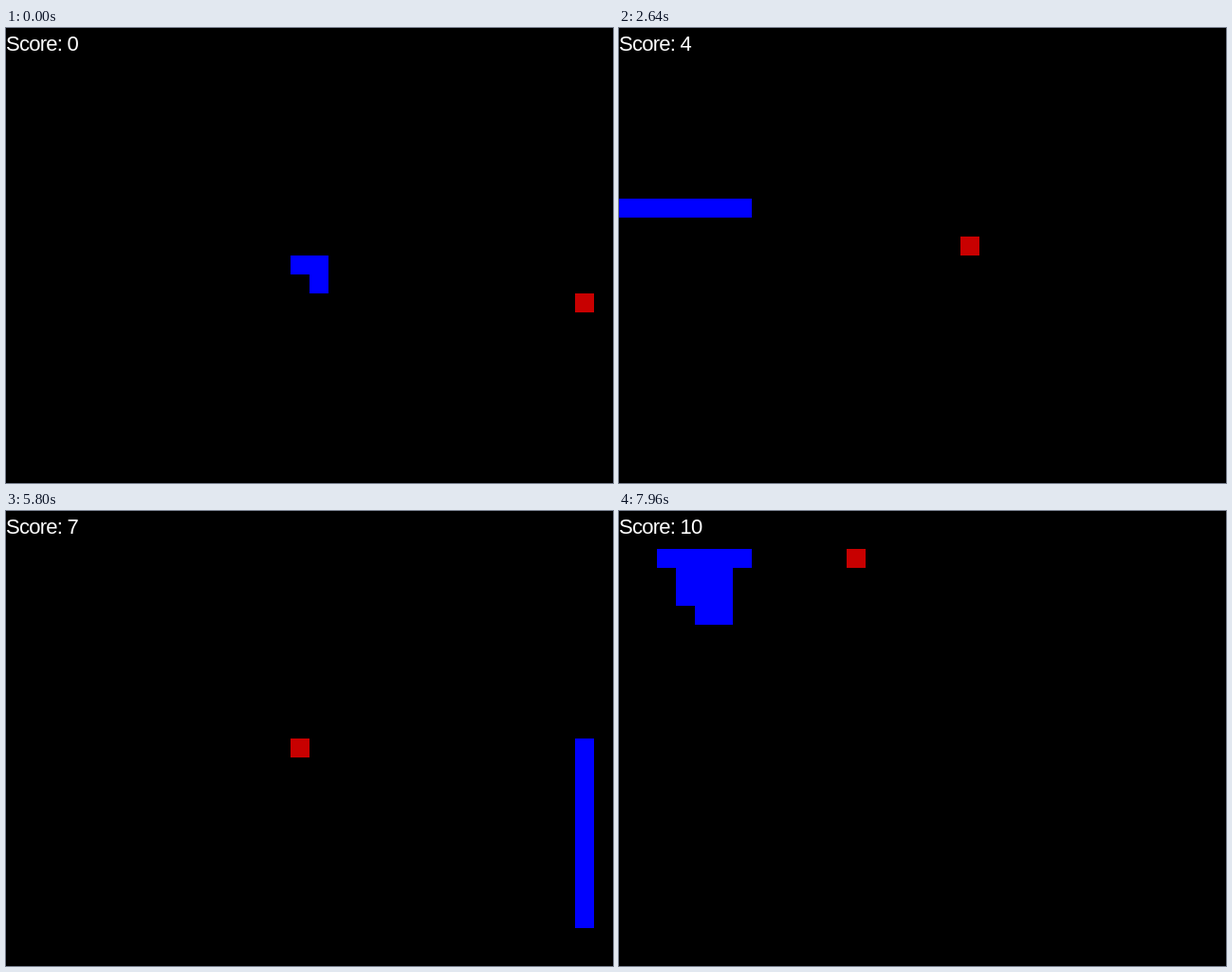
An HTML page with a canvas that plays this animation: 640 px wide and 480 px high, repeating every 8000 ms.

```html
<!DOCTYPE html>
<html lang="en">
<head>
<meta charset="utf-8">
<title>Snake</title>
<style>
  html, body { margin: 0; width: 100%; height: 100%; overflow: hidden; background: #000; }
  canvas { display: block; }
</style>
</head>
<body>
<canvas id="stage" width="640" height="480"></canvas>
<script>
const ctx = document.getElementById('stage').getContext('2d');
const CELL = 20, STEP = 40, LOOP = 8000, START_LENGTH = 3;

// Food cells in the order they are eaten
const foods = [[30, 14], [14, 5], [10, 13], [0, 9], [18, 11], [4, 15],
               [30, 21], [15, 12], [5, 11], [1, 1], [12, 2]];

// The head's route: a direction and a number of cells
const route = 'R1 D1 D1 R14 U9 L16 D8 L4 U4 L10 D2 R18 D4 L14 D6 R26 U9 L15 ' +
              'U1 L10 U10 L4 D1 R3 D1 L1 D1 R1 D1 R1 U3 R1';
const dirs = { L: [-1, 0], R: [1, 0], U: [0, -1], D: [0, 1] };

const path = [[15, 12]];
for (const leg of route.split(' ')) {
  const [dx, dy] = dirs[leg[0]];
  for (let n = +leg.slice(1); n > 0; n--) {
    const [x, y] = path[path.length - 1];
    path.push([x + dx, y + dy]);
  }
}

// Score at each point of the route
let eaten = 0;
const scores = path.map(([x, y]) => {
  const [fx, fy] = foods[eaten];
  if (x === fx && y === fy) eaten++;
  return eaten;
});

function drawCell([x, y], color) {
  ctx.fillStyle = color;
  ctx.fillRect(x * CELL, y * CELL, CELL, CELL);
}

function draw(time) {
  const head = Math.floor((time % LOOP) / STEP) + START_LENGTH - 1;
  const score = scores[head];

  ctx.fillStyle = '#000';
  ctx.fillRect(0, 0, 640, 480);
  for (let i = 0; i < START_LENGTH + score; i++) drawCell(path[head - i], '#00f');
  drawCell(foods[score], '#c80000');

  ctx.font = '22px "Liberation Sans", Arial, sans-serif';
  ctx.letterSpacing = '-0.75px';
  ctx.fillStyle = '#fff';
  ctx.fillText('Score: ' + score, 0, 24);
}

function tick() {
  draw(performance.now());
  requestAnimationFrame(tick);
}
tick();
</script>
</body>
</html>
```
